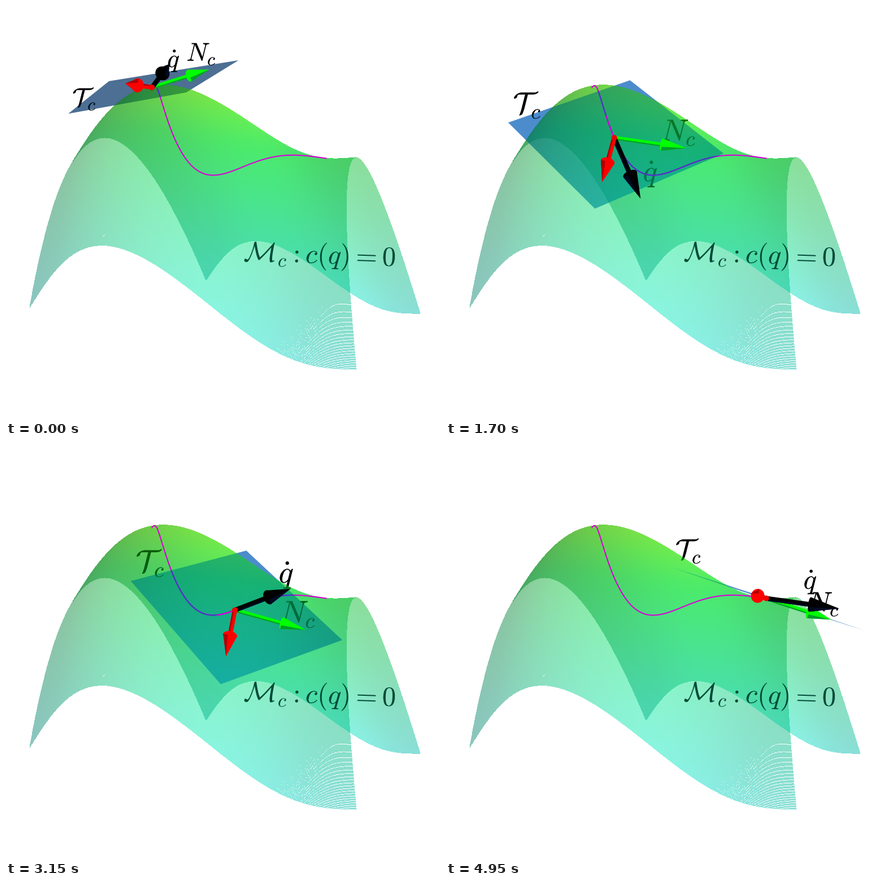
These frames come from a looping animation (768x729 px, 5 s). A matplotlib script:

```python
import numpy as np
import matplotlib.pyplot as plt
from matplotlib.animation import FuncAnimation
from matplotlib.collections import PolyCollection
from matplotlib.patches import PathPatch, Polygon
from matplotlib.textpath import TextPath
from matplotlib.transforms import Affine2D

W, H, FRAMES = 768, 729, 100
SHEET_ALPHA = 0.46
plt.rcParams["mathtext.fontset"] = "cm"

# Camera: homogeneous screen columns for the origin and the u, v, z axes
ORIGIN = np.array([42, 533, 1])
AXIS_U = np.array([516, 231.5, 0.5763])
AXIS_V = np.array([471.5, -0.4, -0.1717])
AXIS_Z = np.array([-55, -339, 0.034])
WAVES = list(enumerate((0.2825, 0.157, -0.0075, 0.008), start=1))


def height(u, v):
    """Parabolic arch across u, sine series along v."""
    return 4 * u * (1 - u) + sum(b * np.sin(k * np.pi * v) for k, b in WAVES)


def slope_u(u):
    return 4 - 8 * u


def slope_v(v):
    return sum(b * k * np.pi * np.cos(k * np.pi * v) for k, b in WAVES)


def surface(u, v):
    u, v = np.asarray(u)[..., None], np.asarray(v)[..., None]
    return ORIGIN + u * AXIS_U + v * AXIS_V + height(u, v) * AXIS_Z


def screen(p):
    return p[..., :2] / p[..., 2:]


def sheets(samples=1400):
    """Pixel images of the far and the near side of the surface."""
    t = np.linspace(0, 1, samples)
    u, v = np.meshgrid(t, t, indexing="ij")
    xy = screen(surface(u, v))
    (xu, yu), (xv, yv) = (np.moveaxis(np.gradient(xy, axis=a), 2, 0)
                          for a in (0, 1))
    near = xu * yv - yu * xv > 0

    z = height(u, v)
    light = np.clip(0.82 - 0.14 * slope_v(v), 0.5, 1)
    rgb = np.stack([72 * np.clip((z - 1) / 0.35, 0, 1),
                    np.full_like(z, 238),
                    np.clip(215 - 165 * z, 0, 255)], axis=2) * light[..., None]
    col, row = xy.astype(int).transpose(2, 0, 1)
    for side in (~near, near):
        image = np.zeros((H, W, 4), np.uint8)
        image[row[side], col[side], :3] = rgb[side]
        image[row[side], col[side], 3] = round(255 * SHEET_ALPHA)
        yield image


def track(n):
    """Surface coordinates of the moving contact point."""
    return 0.572 - 0.4 * np.exp(-((n - 47) / 41)**2), 0.256 + 0.00637 * n


def path(n):
    return screen(surface(*track(np.asarray(n, float))))


# Screen vector from the contact point to the right corner of the plane
AXIS_TIMES = np.array([0, 22, 43, 63, 83, 99]) / 99
AXIS_FIT = np.polyfit(AXIS_TIMES, [(153, -48), (181, 21), (198, 32),
                                   (190, 53), (170, 77), (174, 57)], 5)
LABEL_TIMES = [0, 22, 34, 43, 63, 83, 99]
Q_RIGHT = [38, 41, 64, 78, 91, 90, 78]
Q_DOWN = [-47, 41, 64, 37, -62, -30, -29]


def right_axis(n):
    return np.array([np.polyval(c, n / 99) for c in AXIS_FIT.T])


def downhill(n, length):
    """Screen vector of a given length down the arch, with perspective."""
    u, v = track(n)
    step = length / np.hypot(2.2, slope_u(u))
    tangent = AXIS_U + slope_u(u) * AXIS_Z
    return screen(surface(u, v) - step * tangent) - path(n)


def velocity(n):
    stretch = np.interp(n, [0, 22, 43, 83, 99], [40, 16, 22, 21, 33])
    return stretch * (path(n + 0.5) - path(n - 0.5))


fig = plt.figure(figsize=(7.68, 7.29), dpi=100, facecolor="white")
ax = fig.add_axes([0, 0, 1, 1])
ax.axis("off")
for image, z in zip(sheets(), (1, 5)):
    ax.imshow(image, extent=(0, W, H, 0), aspect="auto",
              interpolation="nearest", zorder=z)
ax.set(xlim=(0, W), ylim=(H, 0))


class Label:
    """Formula centred on a point, drawn once per (color, zorder) layer."""

    def __init__(self, formula, layers):
        glyphs = TextPath((0, 0), formula, size=1)
        box = glyphs.get_extents()
        glyphs = glyphs.transformed(Affine2D().translate(
            -(box.x0 + box.x1) / 2, -(box.y0 + box.y1) / 2))
        self.patches = [ax.add_patch(PathPatch(glyphs, lw=0, fc=color, zorder=z))
                        for color, z in layers]

    def place(self, xy, size, angle=0):
        move = Affine2D().scale(size, -size).rotate_deg(angle).translate(*xy)
        for patch in self.patches:
            patch.set_transform(move + ax.transData)


# Below the plane in full and above it in part, so the plane tints the text
LAYERS = [((0, 0, 0, 1), 2), ((0, 0, 0, 0.6), 4)]
t_label = Label(r"$\mathcal{T}_c$", LAYERS)
n_label = Label(r"$N_c$", LAYERS)
q_label = Label(r"$\dot{q}$", LAYERS)
Label(r"$\mathcal{M}_c : c(q) = 0$",
      [((0, 0.29, 0.22, 1), 5.5)]).place((555, 443), 48.8, 2)

plane = ax.add_patch(Polygon(np.zeros((4, 2)), lw=0, alpha=0.7, zorder=3))
curve_t = np.linspace(0, 99, 400)
curve = path(curve_t)
MAGENTA = (0.85, 0, 0.85)
ax.plot(*curve.T, color=MAGENTA, lw=1.5, zorder=6)
veiled, = ax.plot(*curve.T, color=(0.28, 0.22, 0.77), lw=1.6, zorder=6.1)
touching, = ax.plot([], [], color=MAGENTA, lw=1.5, zorder=6.2)

RING = np.linspace(0, 2 * np.pi, 19)[:-1]
# Length when seen from the side, head start, head radius, shaft half width
ARROWS = [(135, 0.66, 11, 3.4), (135, 0.60, 13, 4.2), (100, 0.54, 12.5, 4)]
LIGHT = [(0, 1, 0), (0, 0, 0), (1, 0, 0)]
DARK = [(0, 0.62, 0.16), (0, 0.04, 0.14), (0.68, 0, 0.02)]
faces = [c for a, b in zip(LIGHT, DARK) for c in (a, b, a, a, b)]
arrows = ax.add_collection(PolyCollection(
    [], facecolors=faces + [(0.95, 0, 0)], linewidths=0, zorder=8),
    autolim=False)


def arrow_shapes(start, vec, full, neck, radius, half):
    """Shaft, its shaded side, cone base, cone, shaded side of the cone."""
    size = np.hypot(*vec)
    along = vec / size
    side = np.array([-along[1], along[0]])
    base, tip = start + neck * vec, start + vec
    tilt = np.sqrt(max(0.02, 1 - (size / full)**2))
    ring = (base + radius * tilt * np.cos(RING)[:, None] * along
            + radius * np.sin(RING)[:, None] * side)

    def strip(a, b):
        return np.array([start + a * side, base + a * side,
                         base + b * side, start + b * side])

    def wedge(a, b):
        return np.array([base + a * side, tip, base + b * side])

    return [strip(-half, half), strip(half * 0.35, half), ring,
            wedge(-radius, radius), wedge(radius * 0.35, radius)]


def update(n):
    c, right = path(n), right_axis(n)
    left = c - 0.97 * right
    plane.set_xy([left, c + downhill(n, -0.545), c + right,
                  c + downhill(n, 0.545)])
    shade = np.interp(n, [0, 22], [0.55, 1])
    plane.set_facecolor((0, 0.36 * shade, 0.72 * shade))
    veiled.set_clip_path(plane)
    last = 99 if n > 75 else n + 1
    near = (curve_t >= n - 7) & (curve_t <= last)
    touching.set_data(*curve[near].T)

    vectors = (0.66 * right, velocity(n), downhill(n, 0.355))
    shapes = []
    for vec, spec in zip(vectors, ARROWS):
        shapes += arrow_shapes(c, vec, *spec)
    shapes.append(c + 5 * np.c_[np.cos(RING), np.sin(RING)])
    arrows.set_verts(shapes)

    size = 58 / surface(*track(n))[2]
    t_label.place(left + size * np.array([0.62, -0.57]), size)
    n_label.place(c + vectors[0] + (-14, -27), size)
    q_label.place(c + (np.interp(n, LABEL_TIMES, Q_RIGHT),
                       np.interp(n, LABEL_TIMES, Q_DOWN)), size)
    return []


anim = FuncAnimation(fig, update, frames=FRAMES, interval=50, repeat=True,
                     repeat_delay=0)
plt.show()
```
